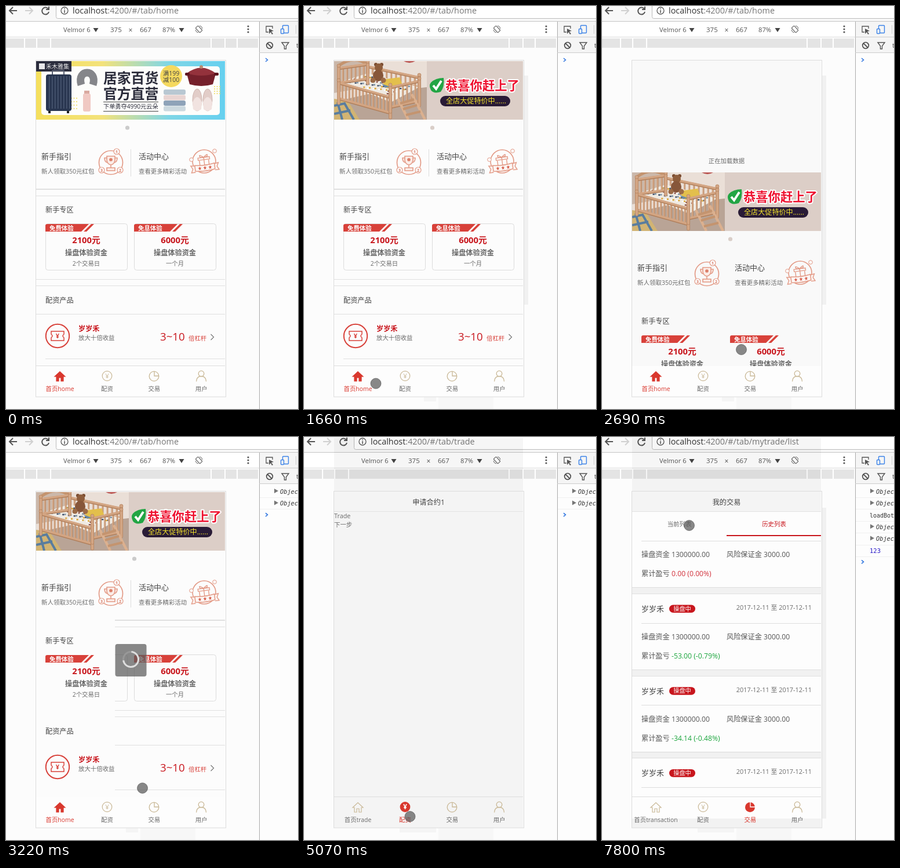
These frames come from a looping animation (504x695 px, 8 s). An HTML page with a canvas:

```html
<!DOCTYPE html>
<html lang="zh-CN">
<head>
<meta charset="utf-8">
<style>
html, body { margin: 0; width: 100%; height: 100%; overflow: hidden; background: #fcfcfc; }
canvas { display: block; }
</style>
</head>
<body>
<canvas id="stage" width="504" height="695"></canvas>
<script>
const c = document.getElementById('stage').getContext('2d');
const SANS = '"Open Sans", "Noto Sans CJK SC", "Noto Sans CJK", "Noto Sans CJK JP", sans-serif';
const MONO = '"DejaVu Sans Mono", monospace';
const RED = '#c8161d', TAB_RED = '#d9382e', TAN = '#c9b896', SALMON = '#e39a86', INK = '#444', GREY = '#6a6a6a';
const LOOP = 8000;

// time, x, y, 1 = arrow
const cursorKeys = [
  [0, -99, 0], [520, 490, 122, 1], [640, 470, 300, 1], [760, 376, 495, 1], [880, 315, 674, 1],
  [1000, 232, 672, 1], [1120, 216, 662], [1240, 147, 652], [1540, 124, 651], [1780, 150, 500],
  [1900, 190, 330], [2020, 215, 225], [2140, 220, 215], [2290, 225, 325], [2440, 231, 440],
  [2560, 236, 540], [2690, 240.5, 592.5], [2830, 238, 602], [3070, 235.5, 605.5], [3720, 228, 615],
  [3840, 221, 625], [4210, 215, 645], [4330, 207, 673, 1], [4450, 180, 673, 1], [4580, 175, 662],
  [4700, 179, 656], [4950, 183, 654.5], [5450, 173, 591], [5570, 165, 428], [5720, 138, 273],
  [5840, 86, 176], [6090, -99, 0], [6340, 268, 674, 1], [6460, 273, 649], [7150, 262, 560],
  [7270, 200, 449], [7390, 310, 140], [7540, 240, 146], [7660, 147, 191], [7800, 150.5, 152.5]
];
const pullKeys = [[0, 0], [2290, 58], [2440, 112], [2560, 165], [2690, 192], [2830, 120], [2950, 50], [3070, 0]];
const logKeys = [[0, 0], [3070, 1], [3220, 2], [6720, 3], [6870, 5], [7000, 6]];
const slideKeys = [[0, 0], [1390, 0.6], [1540, 1]];
const trail = [[5450, 163, 582, 30, 38], [5570, 155, 420, 28, 180], [5720, 128, 264, 47, 171], [5840, 76, 166, 72, 115]];

const at = (keys, t) => keys.filter(k => k[0] <= t).pop();

function text(s, x, y, size, color = INK, align = 'left', style = '', family = SANS) {
  c.font = `${style} ${size}px ${family}`;
  c.textAlign = align;
  c.fillStyle = color;
  c.fillText(s, x, y + size * 0.37);
}
function box(x, y, w, h, color) { c.fillStyle = color; c.fillRect(x, y, w, h); }
function round(x, y, w, h, r, fill, stroke, lw = 1) {
  c.beginPath();
  c.roundRect(x, y, w, h, r);
  paint(fill, stroke, lw);
}
function disc(x, y, r, fill, stroke, lw = 1) { oval(x, y, r, r, fill, stroke, lw); }
function oval(x, y, rx, ry, fill, stroke, lw = 1) {
  c.beginPath();
  c.ellipse(x, y, rx, ry, 0, 0, 7);
  paint(fill, stroke, lw);
}
// SVG path data, moved to x, y
function path(d, x, y, fill, stroke, lw = 1) {
  c.save();
  c.translate(x, y);
  const p = new Path2D(d);
  if (fill) { c.fillStyle = fill; c.fill(p); }
  if (stroke) { c.strokeStyle = stroke; c.lineWidth = lw; c.stroke(p); }
  c.restore();
}
function paint(fill, stroke, lw) {
  if (fill) { c.fillStyle = fill; c.fill(); }
  if (stroke) { c.strokeStyle = stroke; c.lineWidth = lw; c.stroke(); }
}
function clipped(x, y, w, h, draw) {
  c.save();
  c.beginPath();
  c.rect(x, y, w, h);
  c.clip();
  draw();
  c.restore();
}
function turned(x, y, a, draw) {
  c.save();
  c.translate(x, y);
  c.rotate(a);
  draw();
  c.restore();
}

function browser(t) {
  const page = t < 4950 ? 'home' : t < 6600 ? 'trade' : 'mytrade/list';
  box(0, 0, 504, 695, '#fcfcfc');
  box(0, 0, 504, 26, '#f8f8f8');
  round(86.5, -6.5, 430, 28, 3, '#fff', '#bbb');
  path('M7 0H-6M0 -6L-6 0L0 6', 12, 8, null, '#555', 2);
  path('M-7 0H6M0 -6L6 0L0 6', 40, 8, null, '#d0d0d0', 2);
  path('M5 -3A6 6 0 1 0 6 2M6 -7V-2H1', 68, 8, null, '#555', 2);
  disc(101, 8, 6, null, '#555', 1.3);
  box(100.3, 7, 1.5, 5, '#555');
  box(100.3, 4, 1.5, 1.6, '#555');
  text('localhost', 115, 8, 14.4, '#333');
  const w = c.measureText('localhost').width;
  text(':4200/#/tab/' + page, 115 + w, 8, 14.4, '#777');
  box(0, 26, 504, 1, '#c4c4c4');
  box(0, 27, 437, 26, '#fff');
  box(0, 53, 437, 1, '#ddd');

  text('Velmor 6', 99, 41, 11.2, '#555');
  path('M-4.5 -3H4.5L0 4Z', 155, 41, '#444');
  text('375', 180, 41, 11.5, '#555');
  text('×', 215, 42, 12, '#555', 'center');
  text('667', 231, 41, 11.5, '#555');
  text('87%', 270, 41, 11.2, '#555');
  path('M-4.5 -3H4.5L0 4Z', 303, 41, '#444');
  turned(333, 40, -0.75, () => round(-3, -5.5, 6, 11, 1, null, '#666', 1.2));
  path('M-6 1A6 6 0 0 0 -1 6M6 -1A6 6 0 0 0 1 -6', 333, 40, null, '#666');
  for (const y of [35, 40, 45]) disc(418, y, 1.6, '#555');

  box(0, 56, 435, 16, '#e4e4e4');
  for (const x of [31, 52, 76, 353, 377, 398]) box(x, 56, 2, 16, '#fff');
}

function devtools(t) {
  box(437, 27, 67, 668, '#fdfdfd');
  box(437, 27, 67, 53, '#f5f5f5');
  box(437, 27, 1, 668, '#aaa');
  box(437, 53, 67, 1, '#ccc');
  box(437, 80, 67, 1, '#ccc');
  path('M5 -2V-6H-6V4H-2', 455, 41, null, '#555', 1.3);
  path('M-1 -2L7 2L3 3L6 7L4 8L2 4L-1 7Z', 455, 41, '#555');
  round(477.5, 33.5, 10, 13, 1, null, '#3b82e8', 1.4);
  round(474.5, 39.5, 5, 8, 1, '#f5f5f5', '#3b82e8', 1.4);
  box(500, 33, 1, 15, '#ccc');
  disc(455, 68, 5.3, null, '#555', 1.8);
  path('M-4 -4L4 4', 455, 68, null, '#555', 1.8);
  path('M-6 -5H6L1.5 1V6H-1.5V1Z', 482, 68, null, '#555', 1.4);
  text('top', 501, 68, 11, '#555');

  const n = at(logKeys, t)[1];
  for (let i = 0; i < n; i++) {
    const y = 94 + i * 20.4;
    if (i === 2) text('loadBottom', 462, y, 10, '#333', 'left', '', MONO);
    else if (i === 5) text('123', 462, y, 10.5, '#2a1bc8', 'left', '', MONO);
    else {
      path('M-3 -4L4 0L-3 4Z', 466, y - 1, '#777');
      text('Object', 473, y, 10.3, '#333', 'left', 'italic', MONO);
    }
    box(438, Math.round(y + 10), 66, 1, '#f0f0f0');
  }
  path('M-2 -3L1.5 0L-2 3', 450, n ? 93.5 + n * 20.3 : 93, null, '#3579e0', 1.6);
}

function shopBanner() {
  const g = c.createLinearGradient(52, 0, 378, 0);
  g.addColorStop(0, '#f5df5c');
  g.addColorStop(0.35, '#f3e27a');
  g.addColorStop(0.7, '#7fd6e6');
  g.addColorStop(1, '#66d0ef');
  box(52, 95, 326, 101, g);
  round(61, 104, 308, 84, 5, '#fdfdfb');
  for (let i = 0; i < 12; i++) {
    disc(113 + i % 3 * 4.5, 159 + (i / 3 | 0) * 6, 1.1, '#f1dc60');
    disc(360 + i % 3 * 4.5, 139 + (i / 3 | 0) * 4, 1.1, '#f1dc60');
  }
  box(52, 95, 61, 18, '#2b2d3d');
  box(57, 99, 10, 10, '#e8e8ea');
  text('禾木雅集', 69, 104, 10, '#eee');
  // suitcase
  round(80, 111, 20, 12, 2, null, '#555b6e', 2);
  round(69, 118, 44, 63, 4, '#293650');
  for (let x = 74; x < 111; x += 5) box(x, 121, 1.5, 56, '#4a5872');
  box(73, 181, 4, 4, '#222');
  box(105, 181, 4, 4, '#222');
  // pillow, bottle
  path('M-10 13C-19 -15 19 -15 10 13', 140, 123, null, '#85868a', 13);
  box(135, 146, 9, 6, '#d9a9a0');
  round(133, 151, 13, 31, 3, '#f0c9c3');

  text('居家百货', 168, 124, 23.8, '#2b2c3b', 'left', 'bold');
  text('官方直营', 168, 151, 23.8, '#2b2c3b', 'left', 'bold');
  box(168, 165, 95, 1, '#444');
  text('下单勇夺4990元云朵', 168, 173.5, 10.2, '#2b2c3b', 'left', '500');
  box(168, 181, 95, 1, '#444');
  disc(285, 121, 19, '#f5d95f');
  text('满199', 285, 116, 10.5, INK, 'center');
  text('减100', 285, 127, 10.5, INK, 'center');
  // pot
  path('M-25 0H25L20 18Q0 24 -20 18Z', 337, 117, '#75202b');
  path('M-25 0Q0 -19 25 0Q0 8 -25 0Z', 337, 116, '#94323c');
  round(309, 115, 8, 5, 2, '#5e1620');
  round(359, 115, 8, 5, 2, '#5e1620');
  disc(337, 105, 3, '#b98b70');
  // towels, slippers
  ['#b9c8d2', '#e9d5d2', '#8ea3b8', '#ccd9df'].forEach((f, i) => round(272, 144 + i * 9.5, 38, 9, 3, f));
  for (const x of [330, 348]) {
    oval(x, 162, 8, 19, '#e2cdc8', '#cfb5b0');
    path('M-8 2Q0 -16 8 2L7 14Q0 20 -7 14Z', x, 164, '#f1e3e0');
  }
}

// two sloping rails joined by upright bars
function fence(x1, y1, x2, y2, h, n) {
  const shade = '#b07f5b', wood = '#d3a583';
  for (let i = 1; i < n; i++) {
    const k = i / n, x = x1 + (x2 - x1) * k, y = y1 + (y2 - y1) * k;
    box(x - 1.3, y, 2.6, h, wood);
    box(x + 0.9, y, 0.8, h, shade);
  }
  const rail = `M${x1} ${y1}L${x2} ${y2}M${x1} ${y1 + h}L${x2} ${y2 + h}`;
  path(rail, 0, 1, null, shade, 4.5);
  path(rail, 0, 0, null, wood, 3.5);
  for (const [x, y] of [[x1, y1], [x2, y2]]) {
    round(x - 2.5, y - 3, 5, h + 14, 2, wood, shade, 0.7);
    disc(x, y - 4, 3, wood, shade, 0.7);
  }
}

function bedBanner() {
  box(52, 95, 326, 101, '#dccec7');
  clipped(52, 95, 160, 101, () => {
    box(52, 95, 160, 101, '#eadfd7');
    path('M52 95H108V140L52 150Z', 0, 0, '#cbb8aa');
    path('M52 165L120 150L212 140V196H52Z', 0, 0, '#b9a496');
    path('M52 160L76 164L96 196H52Z', 0, 0, '#d2b473');
    path('M52 172L70 168L86 196M52 186L80 180M58 166L66 196', 0, 0, null, '#5a7d9e', 4);
    path('M172 95Q182 101 192 95', 0, 0, '#b9534f');
    fence(110, 104, 199, 123, 17, 11);
    path('M62 131L110 116L199 140L150 166Z', 0, 0, '#efeae2');
    for (let i = 0; i < 70; i++) {
      const u = i * 0.618 % 1, v = i * 0.382 * 3.7 % 1;
      round(68 + u * 78 + v * 40, 129 + u * 23 - v * 13, 3.4, 2.6, 1,
        ['#3f4f6b', '#dca83a', '#ffffff', '#8d5148', '#7c93a5'][i % 5]);
    }
    path('M-18 -5L13 -9L18 4L-12 9Z', 152, 132, '#e3bf4c');
    path('M-18 2L-4 7L-12 9Z', 152, 132, '#6a8aa4');
    disc(124, 101, 3, '#7a4c30');
    disc(134, 101, 3, '#7a4c30');
    disc(129, 106, 7, '#8e5d3c');
    oval(128, 120, 9, 10, '#87563a');
    for (const x of [119, 137]) disc(x, 128, 4.5, '#9c6b47');
    path('M60 103Q86 84 110 101', 0, 0, null, '#c4946f', 5);
    fence(60, 107, 110, 100, 25, 7);
    fence(60, 132, 149, 157, 27, 15);
    fence(149, 140, 199, 129, 34, 7);
    path('M162 160L180 196M186 152L209 196', 0, 0, null, '#dbb08f', 4.5);
    path('M166 168L190 161M171 178L195 171M176 188L201 182', 0, 0, null, '#c4946f', 4);
  });
  path('M-10 -5Q-2 -13 12 -13Q14 2 7 11Q-5 15 -10 8Q-14 0 -10 -5Z', 229, 137, '#22a544');
  path('M-6 0L-1 6L8 -8', 229, 137, null, '#fff', 4);
  c.lineJoin = 'round';
  c.font = `bold 21.3px ${SANS}`;
  c.textAlign = 'left';
  c.strokeStyle = '#fff';
  c.lineWidth = 4;
  c.strokeText('恭喜你赶上了', 244, 145);
  text('恭喜你赶上了', 244, 137.1, 21.3, '#ee1230', 'left', 'bold');
  c.lineJoin = 'miter';
  round(235, 155, 121, 18, 9, '#291b36');
  text('全店大促特价中......', 245, 164, 12.1, '#f5e62c');
}

function badge(n, x, y) {
  disc(x, y, 5, '#fcfcfc', SALMON, 1.2);
  text(n, x, y, 7, '#d77862', 'center', 'bold');
}

function guideIcons() {
  disc(181, 270, 20.5, null, SALMON, 1.7);
  path('M-7 -10H7V-3Q6 4 0 5Q-6 4 -7 -3ZM-7 -7H-11Q-11 0 -6 1M7 -7H11Q11 0 6 1M0 5V10M-7 15V10H7V15Z', 181, 269, '#fbece7', SALMON, 1.6);
  disc(181, 265, 2.8, '#dc806b');
  badge('1', 191, 251);
  badge('2', 197, 283);
  badge('3', 165, 283);

  disc(342, 268, 20, null, SALMON, 1.6);
  turned(342, 268, -0.13, () => {
    path('M-10 -7H10V-3H-10ZM-8 -3V7H8V-3M0 -7V7M0 -7Q-9 -15 -6 -8ZM0 -7Q9 -15 6 -8Z', 0, 0, null, SALMON, 1.4);
    path('M-17 6L-24 5L-21 11L-24 17H-17M17 6L24 5L21 11L24 17H17', 0, 0, '#fcf3f0', SALMON, 1.4);
    path('M-17 5Q0 8 17 5V15Q0 18 -17 15Z', 0, 0, '#fcf6f4', SALMON, 1.5);
    for (const x of [-9, 0, 9]) path('M0 -3L1 -1H3L1 1L2 3L0 2L-2 3L-1 1L-3 -1H-1Z', x, 11, '#d8604e');
  });
  disc(320, 265, 3.3, '#fcfcfc', SALMON);
  disc(360, 250, 3.3, '#fcfcfc', SALMON);
}

function offer(x, tag, sum, days) {
  path('M0 3Q0 0 3 0H75L62 13H0ZM79 0H84L71 13H66Z', x, 376, '#d8413a');
  text(tag, x + 7, 383.5, 10.4, '#fff', 'left', 'bold');
  text(sum, x + 70.5, 404, 14.8, RED, 'center', 'bold');
  text('操盘体验资金', x + 70.5, 425, 12.2, '#666', 'center', 'bold');
  text(days, x + 70.5, 444, 10.4, GREY, 'center');
}

function home(t) {
  const pull = at(pullKeys, t)[1], slide = at(slideKeys, t)[1];
  const dragging = t >= 2290 && t < 3070;
  const lineX = t < 2290 ? 52 : t < 3220 ? 999 : 188;
  clipped(52, 94, 326, 527, () => {
    box(52, 94, 326, 527, dragging ? '#f9f9f9' : '#fcfcfc');
    if (pull) text('正在加载数据', 215, 75 + pull, 10.4, GREY, 'center');
    c.translate(0, pull);
    clipped(52, 95, 326, 101, () => {
      c.translate(-326 * slide, 0);
      if (slide < 1) shopBanner();
      c.translate(326, 0);
      if (slide > 0) bedBanner();
    });
    disc(slide ? 221.5 : 209.5, 210, 3.6, slide && t < 3070 ? '#d9cec8' : '#cbcbcb');

    text('新手指引', 61, 259, 13, INK);
    text('新人领取350元红包', 61, 285, 10.5, GREY);
    text('活动中心', 229, 259, 13, INK);
    text('查看更多精彩活动', 229, 285, 10.4, GREY);
    guideIcons();
    text('新手专区', 68, 351, 12.2, INK);
    if (lineX < 400) clipped(lineX, 94, 400, 600, () => {
      box(52, 315, 326, 2, '#e0e0e0');
      for (const y of [327, 471, 482, 531]) box(52, y, 326, 1, '#e0e0e0');
      box(68, 608, 310, 1, '#e0e0e0');
      box(215, 247, 1, 47, '#ddd');
      for (const x of [68.5, 221.5]) round(x, 375.5, 141, 80, 4, null, '#dcdcdc');
    });
    offer(68, '免费体验', '2100元', '2个交易日');
    offer(221, '免息体验', '6000元', '一个月');
    text('配资产品', 68, 507, 12.2, INK);

    disc(89, 569, 20.2, null, '#d8413a', 2);
    path('M-11 -8H11V-3Q7 0 11 3V8H-11V3Q-7 0 -11 -3Z', 89, 569, null, '#d8413a', 1.5);
    text('¥', 89, 569, 11, '#d8413a', 'center', 'bold');
    text('岁岁禾', 125, 556, 12.2, RED, 'left', 'bold');
    text('放大十倍收益', 125, 572, 10.4, GREY);
    text('3~10', 266, 570, 18.6, RED);
    text('倍杠杆', 315, 573, 10.4, '#d8413a');
    path('M-2.5 -5L2.5 0L-2.5 5', 356, 571, null, '#777', 1.2);
  });
}

function title(s) {
  box(52, 94, 326, 35, '#f4f4f4');
  text(s, 215, 112, 12.2, INK, 'center');
  box(52, 128, 326, 1, '#e2e2e2');
}

function trade(t) {
  box(52, 94, 326, 580, '#f4f4f4');
  for (const [start, ...r] of trail) if (t >= start) box(...r, '#f1f1f1');
  title('申请合约1');
  text('Trade', 52, 136, 10.8, GREY);
  text('下一步', 52, 151, 10.4, GREY);
}

function deal(y, gain) {
  box(52, y - 25, 326, 130, '#fdfdfd');
  box(52, Math.round(y - 26), 326, 1, '#e0e0e0');
  text('岁岁禾', 68, y, 13, INK);
  round(116, y - 6.5, 45, 13.5, 6.7, RED);
  text('操盘中', 138.5, y, 10.2, '#fff', 'center', '500');
  text('2017-12-11 至 2017-12-11', 362, y - 2, 10.9, GREY, 'right');
  box(68, Math.round(y + 24.5), 310, 1, '#ddd');
  text('操盘资金 1300000.00', 68, y + 48.5, 12.2, '#555');
  text('风险保证金 3000.00', 215, y + 48.5, 12.2, '#555');
  text('累计盈亏', 68, y + 81.3, 12.2, '#555');
  text(gain, 120, y + 81.3, 12.2, gain[0] === '-' ? '#1aa53c' : '#d2323c');
  box(52, Math.round(y + 105), 326, 1, '#ddd');
}

function deals(t) {
  box(52, 94, 326, 580, '#f1f1f1');
  if (t >= 6870) clipped(52, 129, 326, 492, () => {
    ['0.00 (0.00%)', '-53.00 (-0.79%)', '-34.14 (-0.48%)', '0.00 (0.00%)']
      .forEach((g, i) => deal(154.3 + i * 141.7, g));
  });
  title('我的交易');
  box(52, 129, 326, 43, '#fdfdfd');
  text('当前列表', 133.5, 150, 10.4, GREY, 'center');
  text('历史列表', 297, 150, 10.4, RED, 'center');
  box(215, 169, 163, 2, RED);
}

function tabs(t) {
  const active = t < 4950 ? 0 : t < 6600 ? 1 : 2;
  const col = i => i === active ? TAB_RED : TAN;
  box(52, 621, 326, 53, active === 1 ? '#f4f4f4' : '#fdfdfd');
  if (active === 1 && t >= 5450) box(164, 621, 30, 45, '#fdfdfd');
  if (active === 2) box(52, 658, 326, 16, '#f2f2f2');
  if (t < 2290 || t >= 4950) box(52, 620, 326, 1, '#ddd');

  path('M-9 0L0 -8.5L9 0H6V8H2V2H-2V8H-6V0Z', 93, 639, active === 0 ? TAB_RED : null, col(0), 1.2);
  disc(174.5, 638, 8.3, active === 1 ? TAB_RED : null, col(1), 1.2);
  text('¥', 174.5, 638, 11.5, active === 1 ? '#fff' : TAN, 'center', active === 1 ? 'bold' : '');
  if (active === 2) {
    disc(255.5, 638.5, 8.5, TAB_RED);
    path('M0 -9V0H9', 256, 638, null, '#fdfdfd', 1.3);
  } else {
    disc(255.5, 638.5, 8.3, null, TAN, 1.3);
    path('M0 -8V0H8', 256, 638, null, TAN, 1.3);
  }
  disc(337, 634, 4.8, null, TAN, 1.3);
  path('M-8.5 9Q-8 0 0 0Q8 0 8.5 9', 337, 638.5, null, TAN, 1.3);

  const names = ['首页' + ['home', 'trade', 'transaction'][active], '配资', '交易', '用户'];
  names.forEach((s, i) => text(s, 93 + i * 81.4, 660, 10.4, i === active ? TAB_RED : GREY, 'center'));
}

function spinner(t) {
  const a = Math.floor((t - 3220) / 120) * 1.2;
  round(188.5, 357, 54, 56, 4, 'rgba(92,92,92,.72)');
  disc(215.5, 383.5, 13, null, '#989898', 3);
  c.beginPath();
  c.arc(215.5, 383.5, 13, -1.5 + a, 3 + a);
  paint(null, '#dedede', 3);
}

function cursor(t) {
  const [, x, y, arrow] = at(cursorKeys, t);
  if (arrow) path('M0 0V16L4 12.5L7 19L9.5 18L6.5 11.5H11.5Z', x + 0.5, y + 0.5, '#fff', '#222', 1);
  else disc(x, y, 9, 'rgba(90,90,90,.72)', 'rgba(70,70,70,.6)', 1);
}

function draw(t) {
  browser(t);
  if (t >= 4950) box(52, 2, 326, 91, 'rgba(0,0,0,.035)');
  if (t >= 760 && t < 3220) box(380, 120, 7, 395, '#f1f1f1');
  if (t >= 6870) box(380, 122, 7, 536, '#f1f1f1');
  if (t >= 1000) {
    box(232, 672, 95, 23, '#f7f7f7');
    box(t < 4450 ? 207 : 165, 672, t < 4450 ? 21 : 63, 10, '#f5f5f5');
  }
  (t < 4950 ? home : t < 6600 ? trade : deals)(t);
  tabs(t);
  c.strokeStyle = '#dcdcdc';
  c.lineWidth = 1;
  c.strokeRect(51.5, 93.5, 328, 580.5);
  devtools(t);
  if (t >= 3220 && t < 3470) spinner(t);
  cursor(t);
}

const start = performance.now();
function tick(now) {
  draw(Math.max(0, now - start) % LOOP);
  requestAnimationFrame(tick);
}
draw(0);
requestAnimationFrame(tick);
</script>
</body>
</html>
```
